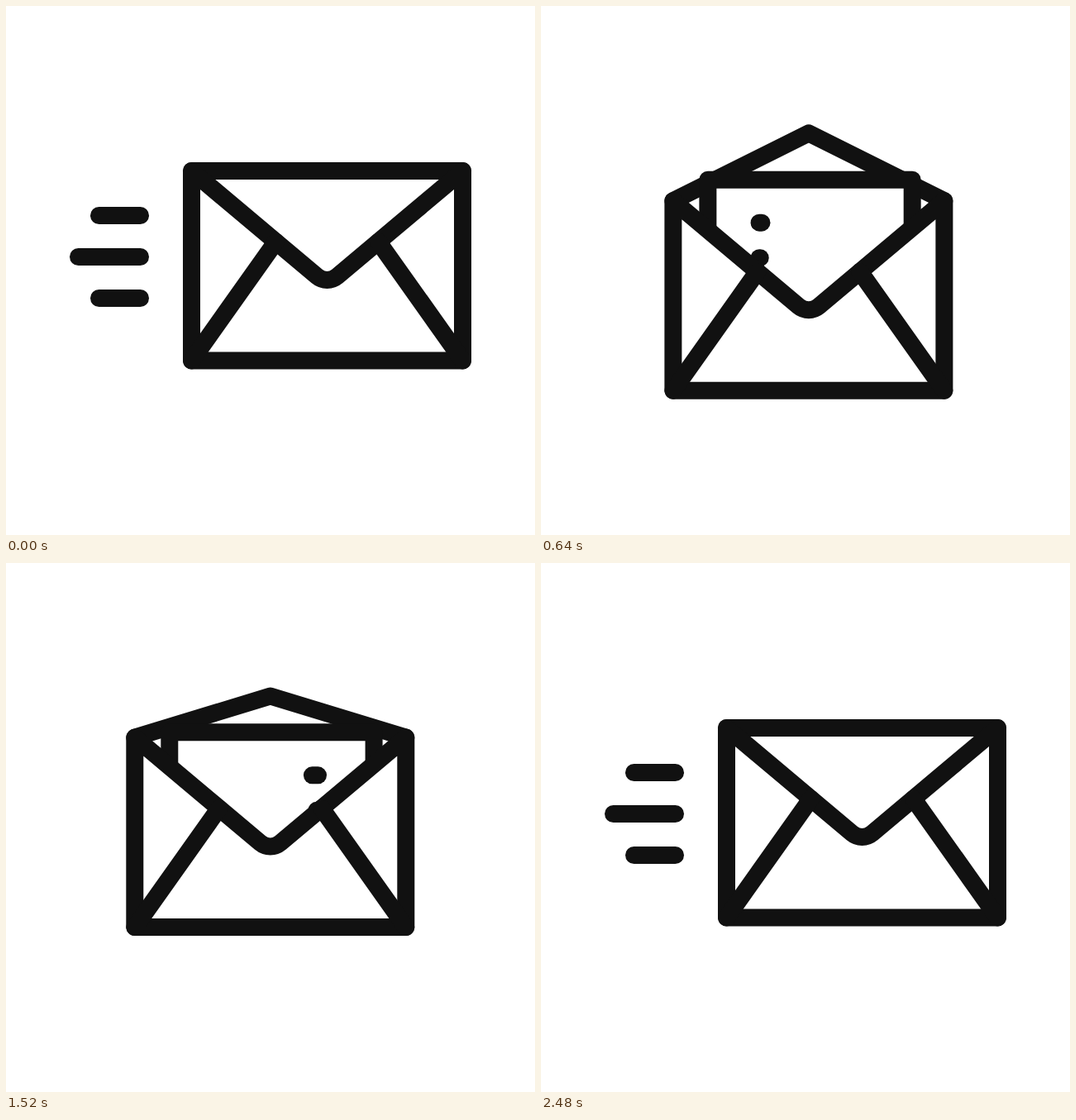
These frames come from a looping animation (640 by 640 pixels, 3000 ms). An HTML page:

```html
<!DOCTYPE html>
<html lang="en">
<head>
<meta charset="utf-8">
<title>Mail animation</title>
<style>
  html, body { margin: 0; width: 100%; height: 100%; overflow: hidden; background: #fff; }
  svg { display: block; width: 100%; height: 100%; }
  path { stroke: #111; stroke-width: 21; stroke-linecap: round; stroke-linejoin: round; fill: none; }
  .paper { fill: #fff; }
</style>
</head>
<body>
<svg viewBox="0 0 640 640">
  <path id="dash0"/>
  <path id="dash1"/>
  <path id="dash2"/>
  <g id="mail">
    <path id="flap" class="paper"/>
    <path id="letter" class="paper"/>
    <path id="text0"/>
    <path id="text1"/>
    <path class="paper" d="M0 0 L151.8 127.5 A19 19 0 0 0 176.2 127.5 L328 0 V229.5 H0 Z"/>
    <path d="M0 229.5 L102 85.7 M328 229.5 L226 85.7"/>
  </g>
</svg>
<script>
const LOOP = 3000, STEP = 40;
const el = id => document.getElementById(id);

// Cubic Bezier easing (0.658, 0, 0.25, 1), solved by bisection
function ease(u) {
  if (u <= 0) return 0;
  if (u >= 1) return 1;
  let lo = 0, hi = 1;
  for (let i = 0; i < 30; i++) {
    const s = (lo + hi) / 2, r = 1 - s;
    const x = 3 * s * r * r * 0.658 + 3 * s * s * r * 0.25 + s * s * s;
    if (x < u) lo = s; else hi = s;
  }
  return lo * lo * (3 - 2 * lo);
}

const ramp = (t, start, length) => ease((t - start) / length);

function line(id, from, to, y, visible) {
  const node = el(id);
  node.style.display = visible ? "" : "none";
  node.setAttribute("d", `M${from} ${y} H${to + 0.01}`);
}

function drawDash(t, id, left, length, y, outAt, backAt) {
  const gone = t >= 540;
  const shift = gone ? 0 : 27 * ramp(t, 190, 440);
  const size = gone ? ramp(t, backAt, 600) : 1 - ramp(t, outAt, 593);
  line(id, left - shift, left - shift + length * size, y, size > 0);
}

function drawText(t, id, y, inAt, outAt) {
  const left = 104.2, length = 117.5;
  const head = ramp(t, inAt, 549), tail = ramp(t, outAt, 549);
  line(id, left + length * tail, left + length * head, y, head > 0 && tail < 1);
}

function draw(t) {
  const x = 224.5 - 68.7 * (ramp(t, 0, 870) - ramp(t, 1813, 617));
  const y = 199.5 + 38.5 * (ramp(t, 0, 870) - ramp(t, 1201, 597));
  el("mail").setAttribute("transform", `translate(${x} ${y})`);

  const peak = -89.5 * (ramp(t, 0, 920) - ramp(t, 1110, 915));
  el("flap").setAttribute("d", `M0 0 L164 ${peak} L328 0`);

  const top = 189.5 - 235 * (ramp(t, 0, 920) - ramp(t, 1248, 810));
  el("letter").setAttribute("d", `M42 208 V${top} H289.3 V208`);
  drawText(t, "text0", top + 52, 553, 1117);
  drawText(t, "text1", top + 94.5, 583, 1050);

  drawDash(t, "dash0", 112.5, 50, 253.5, 40, 1890);
  drawDash(t, "dash1", 87.5, 75, 303.5, 0, 1880);
  drawDash(t, "dash2", 112.5, 50, 353.5, 40, 1880);
}

const begin = performance.now();
function tick() {
  const t = (performance.now() - begin) % LOOP;
  draw(Math.floor(t / STEP) * STEP);
  requestAnimationFrame(tick);
}
draw(0);
requestAnimationFrame(tick);
</script>
</body>
</html>
```
